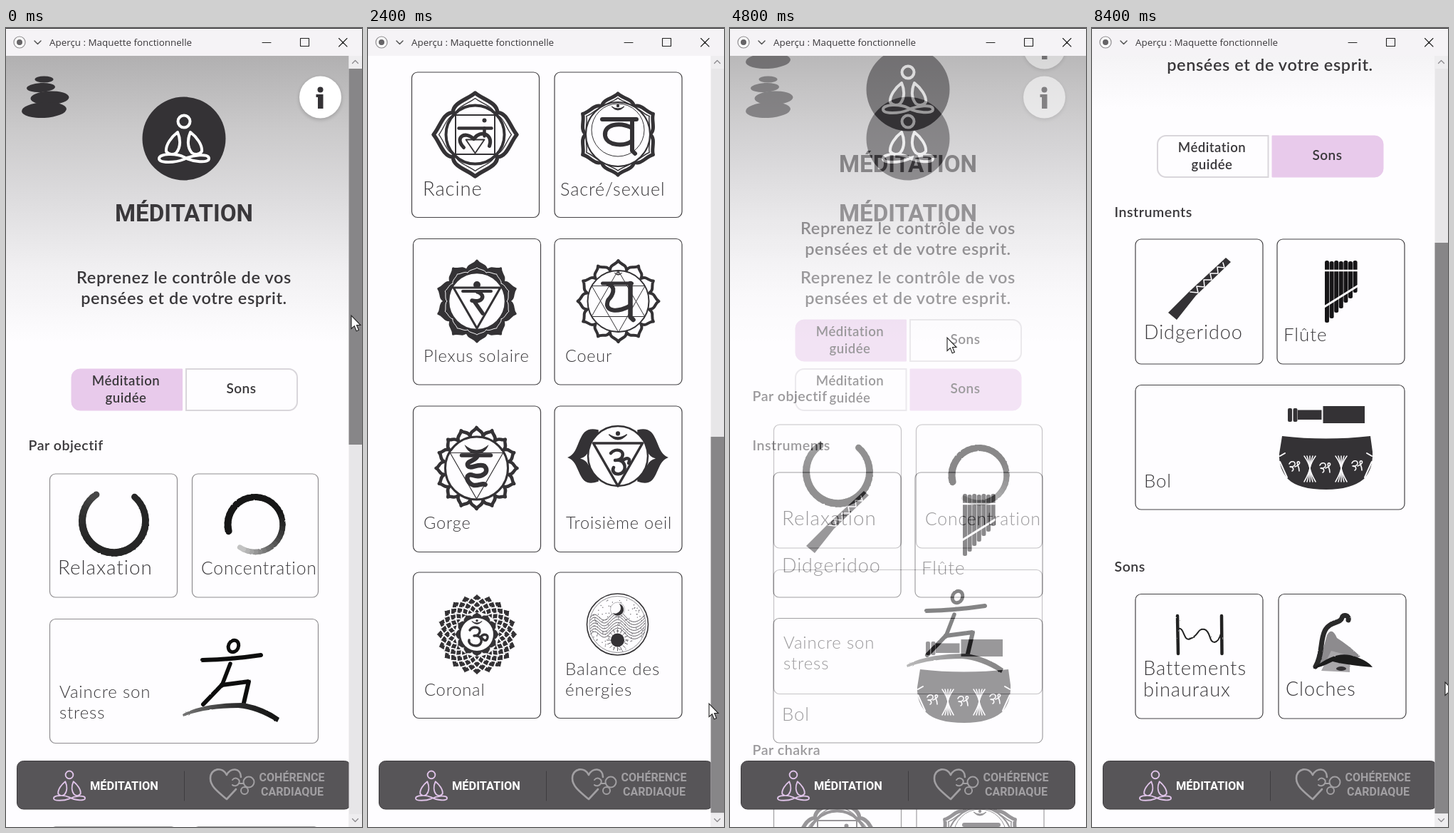
An HTML page that plays this animation: 500 by 1120 pixels, repeating every 8500 ms.

```html
<!DOCTYPE html>
<html lang="fr">
<head>
<meta charset="utf-8">
<title>Maquette fonctionnelle</title>
<style>
html, body { margin: 0; width: 100%; height: 100%; overflow: hidden; background: #fefdff; }
svg { display: block; width: 500px; height: 1120px; }
text { fill: #3a383b; white-space: pre; }
.label { font: 300 24px Lato, sans-serif; letter-spacing: .035em; }
.strong { font: 600 23.5px Lato, sans-serif; letter-spacing: .026em; }
.caps { font: 700 16px Roboto, sans-serif; }
.white { fill: #fff; }
.grey { fill: #a19fa2; }
.bar { font: 13.4px "Open Sans", sans-serif; }
.mid { text-anchor: middle; }
</style>
</head>
<body>
<svg id="stage" viewBox="0 0 500 1120" xmlns="http://www.w3.org/2000/svg"></svg>
<script>
const INK = '#343235', PAPER = '#fefdff', LILAC = '#e8caeb', GREY = '#a19fa2';

// ---- drawing helpers ----
const path = (d, fill = 'none', stroke = 'none', w = 1, more = '') =>
  `<path d="${d}" fill="${fill}" stroke="${stroke}" stroke-width="${w}" ${more}/>`;
const line = (d, w = 1, c = INK) => path(d, 'none', c, w, 'stroke-linecap="round" stroke-linejoin="round"');
const disc = (x, y, r, fill = INK, stroke = 'none', w = 1, more = '') =>
  `<circle cx="${x}" cy="${y}" r="${r}" fill="${fill}" stroke="${stroke}" stroke-width="${w}" ${more}/>`;
const oval = (x, y, rx, ry, turn = 0) =>
  `<ellipse cx="${x}" cy="${y}" rx="${rx}" ry="${ry}" fill="${INK}" transform="rotate(${turn} ${x} ${y})"/>`;
const rect = (x, y, w, h, fill, more = '') =>
  `<rect x="${x}" y="${y}" width="${w}" height="${h}" fill="${fill}" ${more}/>`;
const group = (x, y, body, more = '') => `<g transform="translate(${x} ${y}) ${more}">${body}</g>`;
const text = (cls, x, y, s, size) =>
  `<text class="${cls}" x="${x}" y="${y}" style="${size ? `font-size:${size}px` : ''}">${s}</text>`;
const label = (x, y, s, size) => text('label', x, y, s, size);
const card = (x, y, w, h, c = '#454346') =>
  rect(x, y, w, h, PAPER, `rx="8" stroke="${c}" stroke-width="1.2"`);
const polar = (r, a) => (r * Math.cos(a)).toFixed(1) + ' ' + (r * Math.sin(a)).toFixed(1);

// ring of n ogee petals: valleys on r0, tips on r1
function petals(n, r0, r1, fill, w, stroke = INK, a0 = -Math.PI / 2) {
  const h = Math.PI / n, rm = r0 + (r1 - r0) * .75, rt = r0 + (r1 - r0) * .45;
  let d = '';
  for (let k = 0; k < n; k++) {
    const a = a0 + 2 * h * k;
    d += `${k ? 'L' : 'M'}${polar(r0, a - h)}C${polar(rm, a - h * .78)} ${polar(rt, a - h * .26)} ${polar(r1, a)}` +
         `C${polar(rt, a + h * .26)} ${polar(rm, a + h * .78)} ${polar(r0, a + h)}`;
  }
  return path(d + 'Z', fill, stroke, w, 'stroke-linejoin="round"');
}
function triangle(r, dir, w) {
  const a = dir * Math.PI / 2, s = 2 * Math.PI / 3;
  return line(`M${polar(r, a)}L${polar(r, a + s)}L${polar(r, a - s)}Z`, w);
}
// arc painted as short dabs whose width and tone vary
function brushArc(x, y, r, from, sweep, width, tone) {
  let s = '';
  const n = 36;
  for (let i = 0; i < n; i++) {
    const u = i / n, a = from + sweep * u, v = Math.round(tone(u));
    s += line(`M${polar(r, a)}L${polar(r, a + sweep / n)}`, width(u), `rgb(${v},${v},${v})`);
  }
  return group(x, y, s);
}
let seed = 7;
const rnd = () => (seed = seed * 16807 % 2147483647) / 2147483647;
const rough = s => `<g filter="url(#rough)">${s}</g>`;

// ---- icons ----
const sitter = (c, w) => disc(0, -24, 8.5, 'none', c, w) +
  line('M-9 -9C-18 -2 -26 9 -25 18C-21 23 -15 23 -11 20C-4 12 -5 0 -9 -9Z' +
       'M9 -9C18 -2 26 9 25 18C21 23 15 23 11 20C4 12 5 0 9 -9Z' +
       'M0 26C-12 20 -35 21 -35 28C-35 35 -12 34 0 29C12 23 35 20 35 28C35 35 12 33 0 26', w, c);
const om = line('M-10 -8C-6 -14 5 -13 4 -6C3 -1 -2 0 -4 0C8 -2 10 13 -1 14C-8 14 -12 10 -11 6' +
                'M5 2C10 -5 18 -1 14 5C12 8 9 6 7 3', 3.4);
const moonDot = (y, s = 1) =>
  group(0, y, path('M-9 -3Q0 7 9 -3Q0 3 -9 -3Z', INK, INK) + disc(0, -4, 2.2), `scale(${s})`);

const racine =
  petals(4, 44, 58.5, PAPER, 5.5) + petals(4, 39, 51, PAPER, 1.2) + disc(0, 0, 41, PAPER, INK, 4) +
  line('M-27.5 -27.5H27.5V27.5H-27.5Z', 2) + line('M-23 -9H23', 4.5) + line('M13 -9V2', 4.5) +
  line('M-16 18C-30 4 -14 -6 -2 6C8 -8 26 0 20 16', 5) + line('M-13 7H13L0 26Z', 1.8) + disc(13, -20, 3);
const sacre =
  petals(6, 45, 57, PAPER, 5) + petals(6, 41, 51, PAPER, 1.5) + disc(0, 0, 45, PAPER, INK, 2) +
  disc(0, -6, 37, 'none', INK, 1) + moonDot(-36) + line('M-22 -21H26', 6) + line('M20 -21V23L24 27', 6) +
  line('M20 -9C2 -18 -20 -14 -18 2C-16 16 10 18 20 9', 6);
const plexus =
  petals(10, 45, 57, INK, 3) + petals(10, 42, 47, INK, 1, PAPER) + disc(0, 0, 40, PAPER, INK, 2.5) +
  triangle(38, 1, 3) + disc(0, -23, 5) + line('M-20 -14H20', 4) +
  line('M1 -13C13 -9 8 3 -7 -1M-4 0L8 17', 5.5);
const coeur =
  petals(12, 45, 57, PAPER, 4) + disc(0, 0, 43, PAPER, INK, 2) + triangle(43, 1, 1) + triangle(43, -1, 1) +
  moonDot(-38, .6) + line('M-22 -25H19', 5) + line('M17 -25V22L21 26', 6.5) +
  line('M-14 -24C-2 -20 -8 -8 -14 -2C-22 16 2 16 17 6', 6);
const gorge =
  petals(16, 46, 57, PAPER, 4.6) + disc(0, 0, 44, PAPER, INK, 3) + triangle(43, 1, 1.2) +
  path('M-17 -33Q0 -18 17 -33Q12 -20 0 -20Q-12 -20 -17 -33Z', INK) + line('M-21 -18H20', 5.5) +
  line('M1 -17C-1 -10 -16 -10 -12 -3C-8 2 2 -7 11 -3C19 5 8 14 -5 10C-16 6 -16 20 -4 24C4 25 8 20 12 23', 6.5);
const side = path('M-28 -38C-58 -46 -50 -8 -69 0C-50 8 -58 44 -28 33Z', INK, INK, 1.5) +
  path('M-41 -9Q-45 0 -53 1.5Q-45 3 -41 11Z', PAPER);
const oeil = side + group(0, 0, side, 'scale(-1 1)') +
  disc(0, -2, 42, PAPER, INK, 2.5) + triangle(40, 1, 3.5) + moonDot(-28, 1.4) +
  group(1, 5, line('M-11 -11C-4 -19 9 -15 5 -6C3 -2 -2 -1 -5 -1C11 -4 13 16 1 18C-6 19 -10 14 -7 9M5 0C13 -7 17 -3 14 3', 4.5));
const coronal =
  [58, 53, 48, 43, 38].map((r, i) => petals(20, r - 10, r, INK, 1.8, PAPER, i % 2 * Math.PI / 20)).join('') +
  disc(0, 0, 31, PAPER) + petals(12, 25, 31, INK, .5) + disc(0, 0, 23, PAPER) + group(0, 2, om) + moonDot(-16, .8);
function balance() {
  let s = disc(0, 0, 43, PAPER, INK, 1.6) + disc(0, 0, 39.5, 'none', '#77757a', .8);
  for (let i = 0; i < 130; i++) {
    const [x, y] = polar(38 * Math.sqrt(rnd()), rnd() * 6.283).split(' ');
    s += disc(x, y, .7, '#66646a');
  }
  for (let i = 0; i < 7; i++) {
    const y = i * 4 - 10;
    s += line(`M-38 ${y}C-28 ${y - 14} -24 ${y + 14} -12 ${y}S4 ${y - 9} 12 ${y}S28 ${y + 9} 38 ${y - 3}`, 1, '#5c5a5f');
  }
  s += disc(0, -21, 10, PAPER, '#88868b', .6) + path('M2 -29A8.5 8.5 0 1 1 -7 -16A8 8 0 0 0 2 -29Z', INK);
  let rays = '';
  for (let i = 0; i < 16; i++) rays += line(`M${polar(11, i * .393)}L${polar(15, i * .393)}`, .8);
  return s + group(0, 22, disc(0, 0, 9.5) + rays);
}

const relaxRing = rough(brushArc(151.5, 691, 44.5, -.86, 4.98, u => 9 + 1.5 * Math.sin(u * 3), u => 38 + 40 * Math.pow(u, 8)));
const focusRing = rough(brushArc(350, 696, 38.5, 2.9, 5.55, u => 10 - 3 * u, u => u < .5 ? 22 : 22 + Math.pow(u * 2 - 1, 1.6) * 190));
const yogi = rough(
  `<ellipse cx="319.5" cy="866.5" rx="7" ry="8.5" fill="none" stroke="#111" stroke-width="5" transform="rotate(25 319.5 866.5)"/>` +
  line('M276 886Q318 885 358 879', 6, '#111') + line('M315 891L303 922', 5.5, '#111') +
  line('M303 921L341 916L334 946', 6, '#111') + line('M303 921L277 948', 6, '#111') +
  path('M248 962Q276 946 334 946Q364 952 384 967L381 973Q352 955 326 953Q280 953 249 965Z', 'url(#ground)'));

const didgeridoo = path('M188 649L195 655L146 702L119 736L107 726L137 696Z', INK) +
  line('M184 656L186 663L176 662L177 671L166 671L168 680L157 680L158 690L147 689L149 698L138 697', 1.6, PAPER);
function flute() {
  let s = '';
  for (let i = 0; i < 7; i++) s += rect(327 + i * 6.6, 653 + i % 2, 6, 87 - i * 7, '#161517', 'rx="2.5"');
  return s + line('M326 667H374', 2.5, PAPER) + line('M326 718L374 688', 3, PAPER);
}
function bowl() {
  const rays = x => [-8, -4, 0, 4, 8].map(d =>
    line(`M${x + d} 927Q${x + d * .2} 936 ${x} 944Q${x + d * .2} 952 ${x + d} 963`, 1.5, PAPER)).join('');
  const sign = (x, y) => group(x, y, line('M-8 -3C-6 -8 1 -7 0 -2C-1 1 -6 2 -7 1C-2 0 -1 6 -4 7M0 1C8 -2 8 -7 4 -6C1 -4 6 -1 6 7', 1.6, PAPER));
  return rect(275, 860, 6, 19, INK, 'rx="2"') + rect(282.5, 860, 6, 19, INK, 'rx="2"') +
    rect(289, 862.5, 33.5, 13.5, INK) + rect(324.5, 857, 58.5, 24, INK) +
    path('M267 899Q328 906 391 899L394 921Q395 945 382 959Q364 974 329 974Q290 974 275 959Q262 944 263 924Z', INK) +
    rays(306) + rays(350) + line('M264 927L271 923M264 935L274 957M393 927L386 923M393 935L383 957', 2, PAPER) +
    sign(285, 941) + sign(328, 943) + sign(373, 940);
}
const beats = rough(line('M120 1151L121 1204M182 1151L182.5 1204', 4.5, '#222') +
  line('M121 1169C130 1166 128 1188 138 1183C150 1179 148 1168 158 1170C167 1173 164 1188 172 1188Q178 1187 181 1176', 2, '#222'));
const bell = rough(
  path('M330 1178Q337 1166 344 1182Q360 1192 377 1208Q350 1218 318 1222Z', '#8d8b8e') +
  path('M336 1200L362 1207L362 1230L322 1228Z', '#a9a7aa') +
  line('M360 1157C362 1150 352 1148 351 1154C349 1162 334 1158 327 1172C320 1186 324 1206 314 1222', 7, '#2b292c') +
  path('M310 1225Q340 1201 362 1206Q386 1212 394 1223Q358 1220 338 1215Q322 1223 310 1225Z', '#1d1c1e') +
  oval(350, 1225, 7, 3));

// ---- pages ----
function header(guided) {
  const left = 'M104 478H247.5V536H104A12 12 0 0 1 92 524V490A12 12 0 0 1 104 478Z';
  const right = 'M253 478H397A12 12 0 0 1 409 490V524A12 12 0 0 1 397 536H253Z';
  const tab = (d, on) => path(d, on ? LILAC : PAPER, on ? LILAC : '#d9d6db', on ? 1 : 2);
  return rect(0, 0, 500, 2200, PAPER) + rect(0, 39, 500, 401, 'url(#sky)') +
    oval(53.5, 72, 13, 4.5) + oval(49, 83.5, 20, 6.5, -3) + oval(61.5, 98, 27, 9.5, -2) + oval(53.5, 115, 31.5, 11, -3) +
    disc(441.5, 99, 30, '#000', 'none', 0, 'opacity=".17" filter="url(#soft)"') + disc(441.5, 97, 29.5, '#fff') +
    disc(441.5, 86.5, 4) + path('M435.5 93H445.5V113H438V97H435.5Z', INK) +
    disc(250, 155, 58.5) + group(250, 155, sitter('#fff', 4)) +
    text('caps mid', 250, 270.5, 'MÉDITATION', 33.2) +
    text('strong mid', 250, 358, 'Reprenez le contrôle de vos') +
    text('strong mid', 250, 387, 'pensées et de votre esprit.') +
    tab(left, guided) + tab(right, !guided) +
    text('strong mid', 168.5, 501, 'Méditation', 18.6) + text('strong mid', 168.5, 525, 'guidée', 18.6) +
    text('strong mid', 330.5, 512, 'Sons', 19);
}
const title = (y, s) => text('strong', 31.5, y, s, 19.6);

const guidedPage = header(true) + title(592, 'Par objectif') +
  card(61.5, 625, 179, 173, '#8f8d90') + card(261.5, 625, 177, 173, '#8f8d90') + card(61.5, 828.5, 377, 174, '#8f8d90') +
  relaxRing + focusRing + yogi +
  label(73, 766, 'Relaxation', 27.8) + label(274, 766, 'Concentration', 24.7) +
  label(75, 939, 'Vaincre son', 24) + label(75, 968, 'stress', 24) +
  title(1088, 'Par chakra') +
  card(61.5, 1120, 179, 203.5) + card(262, 1120, 179, 203.5) +
  [1353.5, 1588, 1821].map(y => card(63.5, y, 179, 204.5) + card(262, y, 179, 204.5)).join('') +
  group(150.5, 1207.5, racine) + group(351, 1207, sacre) + group(153, 1441, plexus) + group(351.5, 1441, coeur) +
  group(152.5, 1675, gorge) + group(351, 1660, oeil) + group(153, 1908, coronal) + group(350.5, 1894, balance()) +
  label(77, 1293, 'Racine', 27.4) + label(270, 1293, 'Sacré/sexuel', 25.2) +
  label(78, 1525.5, 'Plexus solaire', 23.7) + label(277, 1525.5, 'Coeur', 23.4) +
  label(78, 1759.5, 'Gorge', 23.6) + label(278, 1759.5, 'Troisième oeil', 23.5) +
  label(79, 1994, 'Coronal', 23.7) + label(277, 1965, 'Balance des', 24.2) + label(277, 1994, 'énergies', 24.2);

const soundPage = header(false) + title(592, 'Instruments') +
  card(61, 623, 179, 175) + card(260, 623, 179, 175) + card(61, 827.5, 378, 174.5) +
  didgeridoo + flute() + bowl() +
  label(73, 763, 'Didgeridoo', 27) + label(269, 765.5, 'Flûte', 26) + label(73, 971, 'Bol', 25.8) +
  title(1089, 'Sons') + card(61, 1120.5, 179, 174.5) + card(262, 1120.5, 179, 174.5) +
  beats + bell +
  label(72, 1234, 'Battements', 27.4) + label(72, 1264, 'binauraux', 27.2) + label(272, 1263, 'Cloches', 26.9);

const navBar = rect(15.5, 1027.5, 469, 67.5, '#575558', 'rx="9" stroke="#3c3a3d"') +
  group(89, 1062, sitter('#dfc3e8', 3), 'scale(.63)') +
  text('caps white', 118, 1068, 'MÉDITATION', 16.4) + line('M250.5 1042V1083', 1, '#3f3d40') +
  line('M323 1067L310 1081C298 1071 287 1063 287 1052C287 1037 305 1035 310 1047C315 1036 330 1037 330 1050', 2.6, GREY) +
  line('M318 1054C322 1049 330 1053 327 1059C325 1063 320 1063 318 1061', 2, GREY) +
  disc(341, 1057, 7.5, 'none', GREY, 2) + disc(335, 1069, 5, 'none', GREY, 2) + line('M327 1059H334', 2, GREY) +
  text('caps grey mid', 401.5, 1055.5, 'COHÉRENCE') + text('caps grey mid', 402, 1076, 'CARDIAQUE');

const windowBar = rect(0, 0, 500, 39, '#f5f3f6') + rect(0, 0, 500, 1, '#2b292c') +
  disc(19, 20, 8, '#fff', '#8d8b8e', 1.2) + disc(19, 20, 4, '#666467') + line('M40 18L44.5 22.5L49 18', 1.5, '#555') +
  text('bar', 61, 25, 'Aperçu : Maquette fonctionnelle') +
  line('M360 20.5H372M413.5 14.5H425.5V25.5H413.5ZM467.5 14.5L479 26M479 14.5L467.5 26', 1.1, '#222');

document.getElementById('stage').innerHTML = `
<defs>
  <linearGradient id="sky" x2="0" y2="1">
    <stop stop-color="#b1b0b1"/><stop offset=".25" stop-color="#cac9ca"/><stop offset=".5" stop-color="#dddcde"/>
    <stop offset=".75" stop-color="#f1f0f2"/><stop offset="1" stop-color="${PAPER}"/>
  </linearGradient>
  <linearGradient id="ground"><stop stop-color="#777"/><stop offset=".5" stop-color="#333"/><stop offset="1" stop-color="#111"/></linearGradient>
  <filter id="rough"><feTurbulence type="fractalNoise" baseFrequency=".2" numOctaves="2" seed="4"/>
    <feDisplacementMap in="SourceGraphic" scale="1.8" xChannelSelector="R" yChannelSelector="G"/></filter>
  <filter id="soft" x="-30%" y="-30%" width="160%" height="160%"><feGaussianBlur stdDeviation="2.5"/></filter>
</defs>
<g id="sound">${soundPage}</g>
<g id="guided">${guidedPage}</g>
${navBar}
<g id="scroll">${rect(481.5, 39, 18.5, 1081, '#e7e6e8')}${rect(481.5, 39, 18.5, 18, '#eeedef')}${rect(481.5, 1102, 18.5, 18, '#eeedef')}
  ${line('M486.5 49.5L490.5 45.5L494.5 49.5M486.5 1108.5L490.5 1112.5L494.5 1108.5', 1.2, '#88868a')}
  <rect id="thumb" x="481.5" width="18.5"/></g>
${windowBar}
<path id="cursor" d="M0 0V18.5L4.3 14.6L7.2 21.8L10.4 20.5L7.5 13.5H13Z" fill="#fff" stroke="#222" stroke-width="1.1"/>`;

// ---- motion ----
const LOOP = 8500;
const $ = id => document.getElementById(id);
const sound = $('sound'), guided = $('guided'), bar = $('scroll'), thumb = $('thumb'), cursor = $('cursor');
const clamp = u => Math.max(0, Math.min(1, u));
const ease = (a, b, t) => { const u = clamp((t - a) / (b - a)); return u * u * (3 - 2 * u); };
const trail = [
  [200, 485, 403], [1630, 470, 935], [1900, 478, 945], [2300, 478, 945], [3000, 492, 981], [3124, 492, 981],
  [4100, 490, 500], [4550, 305, 434], [5000, 305, 434], [5700, 487, 576], [6186, 487, 576],
  [7600, 484, 834], [8000, 484, 834], [8400, 496, 917]
];
function pointer(t) {
  let [, x, y] = trail[0];
  for (let i = 1; i < trail.length; i++) {
    const a = trail[i - 1], b = trail[i], u = ease(a[0], b[0], t);
    x += (b[1] - a[1]) * u;
    y += (b[2] - a[2]) * u;
  }
  return [x, y];
}
const within = (t, a, b) => t >= a && t < b;
const shift = (el, x, y) => el.setAttribute('transform', `translate(${Math.round(x)} ${Math.round(y)})`);
const show = (el, on) => el.setAttribute('display', on ? 'inline' : 'none');

// the picture advances ten times a second
function draw(ms) {
  const t = Math.floor(ms % LOOP / 100) * 100;
  const s1 = 1058 * ease(200, 1631, t) - 989 * ease(3124, 4100, t);
  const s2 = 327 * ease(6186, 7600, t);
  const fade = clamp((t - 4600) / 400), first = t < 4800;
  shift(guided, 0, -s1);
  shift(sound, 0, -s2);
  guided.setAttribute('opacity', 1 - fade);
  show(guided, fade < 1);
  show(sound, fade > 0);

  const held = within(t, 300, 2400) || within(t, 3000, 4200) || within(t, 6100, 8100);
  const away = within(t, 4200, 5500);
  show(bar, !within(t, 4600, 5000));
  thumb.setAttribute('y', Math.round(57 + (first ? s1 * .488 : s2 * .745)));
  thumb.setAttribute('height', first ? 527 : 800);
  thumb.setAttribute('fill', held ? '#5a585b' : away ? '#c1c0c2' : '#878688');
  shift(cursor, ...pointer(t));
}
const start = performance.now();
function tick() {
  draw(performance.now() - start);
  requestAnimationFrame(tick);
}
draw(0);
requestAnimationFrame(tick);
</script>
</body>
</html>
```
